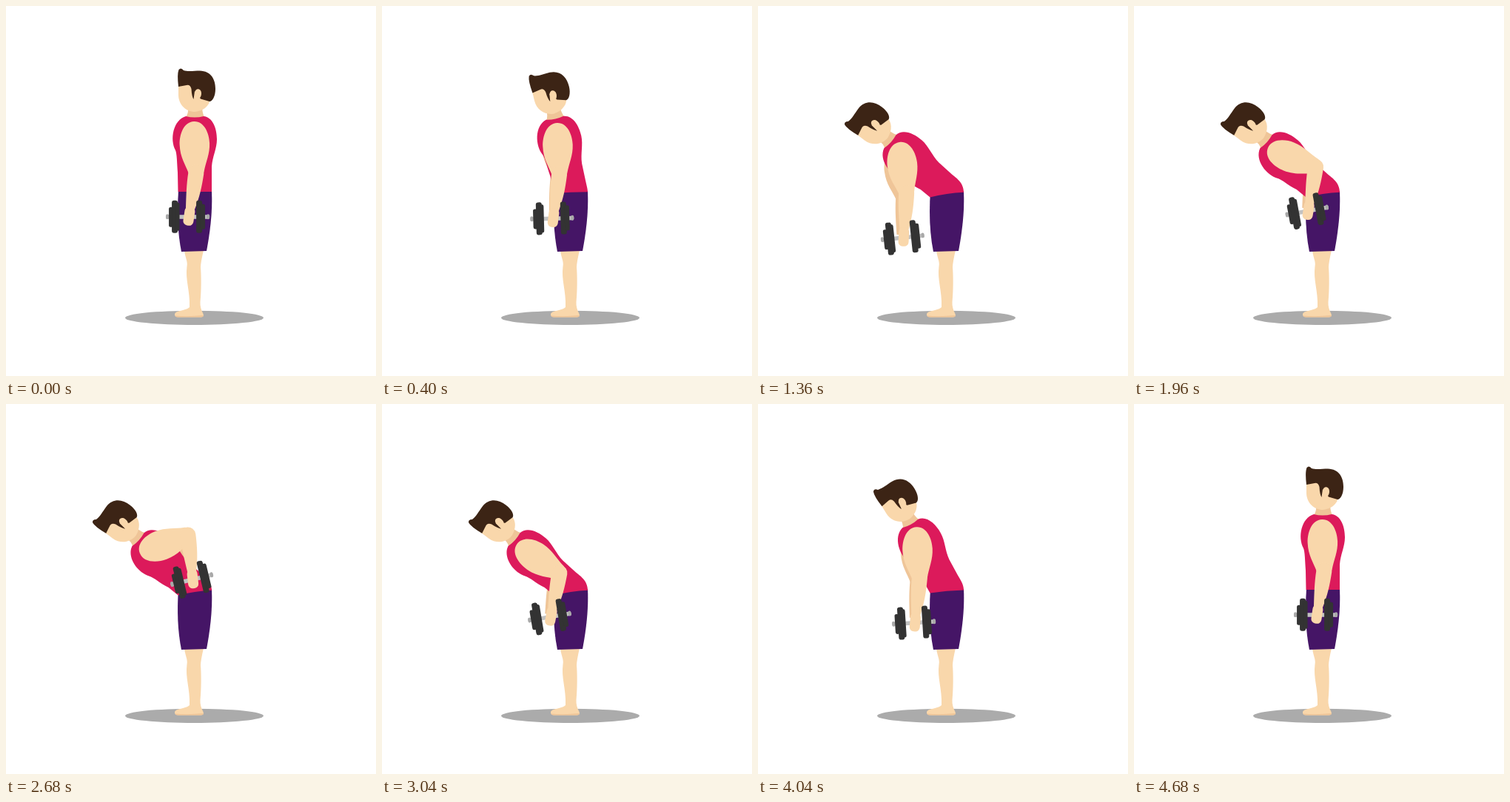
Recreate the animation shown at these times as an HTML page. Size 500 by 500 pixels, loop 5.04 s.

```html
<!DOCTYPE html>
<html lang="en">
<head>
<meta charset="utf-8">
<title>Bent-over row</title>
<style>
  html, body { margin: 0; width: 100%; height: 100%; overflow: hidden; background: #fff; }
  svg { display: block; width: 100vw; height: 100vh; }
  .skin { fill: #f9d7ab; }
  .shade { fill: #efc598; }
</style>
</head>
<body>
<svg viewBox="0 0 500 500">
  <defs>
    <path id="upperShape" d="M0,-13C14,-13 20,4 20,17C20,32 14,42 11,56A11,11 0 0 1 -10,56C-13,46 -20.500,35 -20.500,18C-20.500,4 -14,-13 0,-13Z"/>
    <path id="foreShape" d="M-10,0C-10,20 -8,32 -6,50H6C10,32 11,20 11,0A10.5,10.5 0 0 0 -10,0Z"/>
  </defs>

  <ellipse cx="254.5" cy="421.3" rx="93.5" ry="9.6" fill="#ababab"/>
  <path class="skin" d="M241,330C242,340 246,345 244.500,352C242,370 249,385 248,407C244,412 228,411 228,417Q228,420.500 233,420.500H264Q268,420 266.500,416Q262,408 262.500,400C264,385 264,365 263,353Q263,347 267,330Z"/>
  <path class="shade" d="M228.500,418.500Q246,420 266.800,418Q267,420.500 262,420.500H233Q229,420.500 228.500,418.500Z"/>

  <g id="farArm" class="shade">
    <use class="upper" href="#upperShape"/>
    <use class="fore" href="#foreShape"/>
  </g>

  <path id="neck" class="shade" d="M246,135H265Q265,144 268,150Q255,156 243,150Q247,145 246,135Z"/>
  <g id="head">
    <path class="skin" d="M233,104V120C233,134 244,143 255,143C266,142 276,135 276,124L270,100Z"/>
    <path fill="#3c2415" d="M233.500,86Q236.500,82.500 240,87C246,89 254,87.500 262,87.500C277,88 283,99 283,112C283,122 279,129 275,129L263,125.500L255,115L253.500,126Q251,122 250.500,112Q249,106 244,107L233,109Q231,92 233.500,86Z"/>
    <path class="skin" d="M255,117C256,110 264,111 264,118C264,122 262,126 258,126Q255,124 255,117Z"/>
  </g>

  <path fill="#451566" d="M233,250H278C279.500,280 275,310 271,331L237,332C232,307 231,280 233,250Z"/>
  <path id="torso" fill="#dc1a5b"/>

  <g class="skin">
    <use class="upper" href="#upperShape"/>
    <use class="fore" href="#foreShape"/>
  </g>
  <g id="dumbbell" fill="#333">
    <rect x="-29.500" y="-2.500" width="59" height="5.500" rx="2" fill="#c2c2c2"/>
    <rect x="-29.500" y="-3.500" width="4" height="7" rx="2" fill="#a9a9a9"/>
    <rect x="25.500" y="-3.500" width="4" height="7" rx="2" fill="#a9a9a9"/>
    <rect x="-25.500" y="-13" width="6" height="27" rx="2.500"/>
    <rect x="-21.500" y="-22" width="8" height="44" rx="3"/>
    <rect x="-17" y="-19" width="6" height="38" rx="2.500"/>
    <rect x="11.500" y="-22" width="8" height="44" rx="3"/>
    <rect x="17" y="-17" width="6.500" height="34" rx="2.500"/>
  </g>
  <rect id="hand" class="skin" x="-7" y="47" width="14" height="25.500" rx="6"/>
</svg>
<script>
const LOOP = 5040, STEP = 40, MAX_BEND = 48;
const HIP = [255, 252], SHOULDER = [254.5, 169], EAR = [259, 119], UPPER = 56, FORE = 62;
const byId = id => document.getElementById(id);
const rad = deg => deg * Math.PI / 180;

const ease = (t, from, to) => {
  const p = Math.min(1, Math.max(0, (t - from) / (to - from)));
  return p * p * (3 - 2 * p);
};

// Lean a point forward around the hip
const lean = ([x, y], deg) => {
  const dx = x - HIP[0], dy = y - HIP[1], c = Math.cos(rad(deg)), s = Math.sin(rad(deg));
  return [HIP[0] + dx * c + dy * s, HIP[1] - dx * s + dy * c];
};
const leanPath = (d, deg) =>
  d.replace(/([\d.]+),([\d.]+)/g, (_, x, y) => lean([+x, +y], deg).map(v => v.toFixed(2)));

// End of a limb; 0 degrees hangs straight down
const reach = ([x, y], length, deg) =>
  [x + length * Math.sin(rad(deg)), y + length * Math.cos(rad(deg))];

const place = (el, [x, y], deg) =>
  el.setAttribute('transform', `translate(${x} ${y}) rotate(${-deg})`);

function torsoPath(bend, deg) {
  const back = leanPath('M243,149Q255,152 267,149C279,150 285,165 285,180C285,193 279,203 278,217L278,240C278,248 ', deg);
  const hip = 251 + 0.7 * bend;
  const hem = `278,${251 - 13 * bend} 278,${hip}Q255,${hip + bend} 232.5,${251 + 7.5 * bend}L`;
  const waist = leanPath('232,225', deg * 0.9);
  const front = leanPath('C231,210 231,200 229,195C221,180 226,154 243,149Z', deg);
  return back + hem + waist + front;
}

function draw(time) {
  const t = Math.floor(time % LOOP / STEP) * STEP;
  const bend = ease(t, 0, 1220) - ease(t, 3560, 4660);
  const row = ease(t, 1320, 2520) - ease(t, 2520, 3480);
  const deg = MAX_BEND * bend;

  const upperDeg = 2 + 5 * bend ** 3 + 112 * row;
  const foreDeg = -8.7 + 5.7 * bend + 14 * row - 14 * Math.sin(Math.PI * row);
  const shoulder = lean(SHOULDER, deg);
  const elbow = reach(shoulder, UPPER, upperDeg);
  const grip = reach(elbow, FORE, foreDeg);

  const bodyTurn = `rotate(${-deg} ${HIP})`;
  byId('neck').setAttribute('transform', bodyTurn);
  byId('head').setAttribute('transform', `${bodyTurn} rotate(${-5 * bend} ${EAR})`);
  byId('torso').setAttribute('d', torsoPath(bend, deg));
  document.querySelectorAll('.upper').forEach(el => place(el, shoulder, upperDeg));
  document.querySelectorAll('.fore').forEach(el => place(el, elbow, foreDeg));
  byId('farArm').setAttribute('transform', `translate(${-4 * bend} ${7 * bend})`);
  place(byId('hand'), elbow, foreDeg);
  place(byId('dumbbell'), [grip[0] - 1.5, grip[1] - 1.5], 6 * bend + 8 * row);
}

function loop() {
  draw(performance.now());
  requestAnimationFrame(loop);
}
loop();
</script>
</body>
</html>
```
